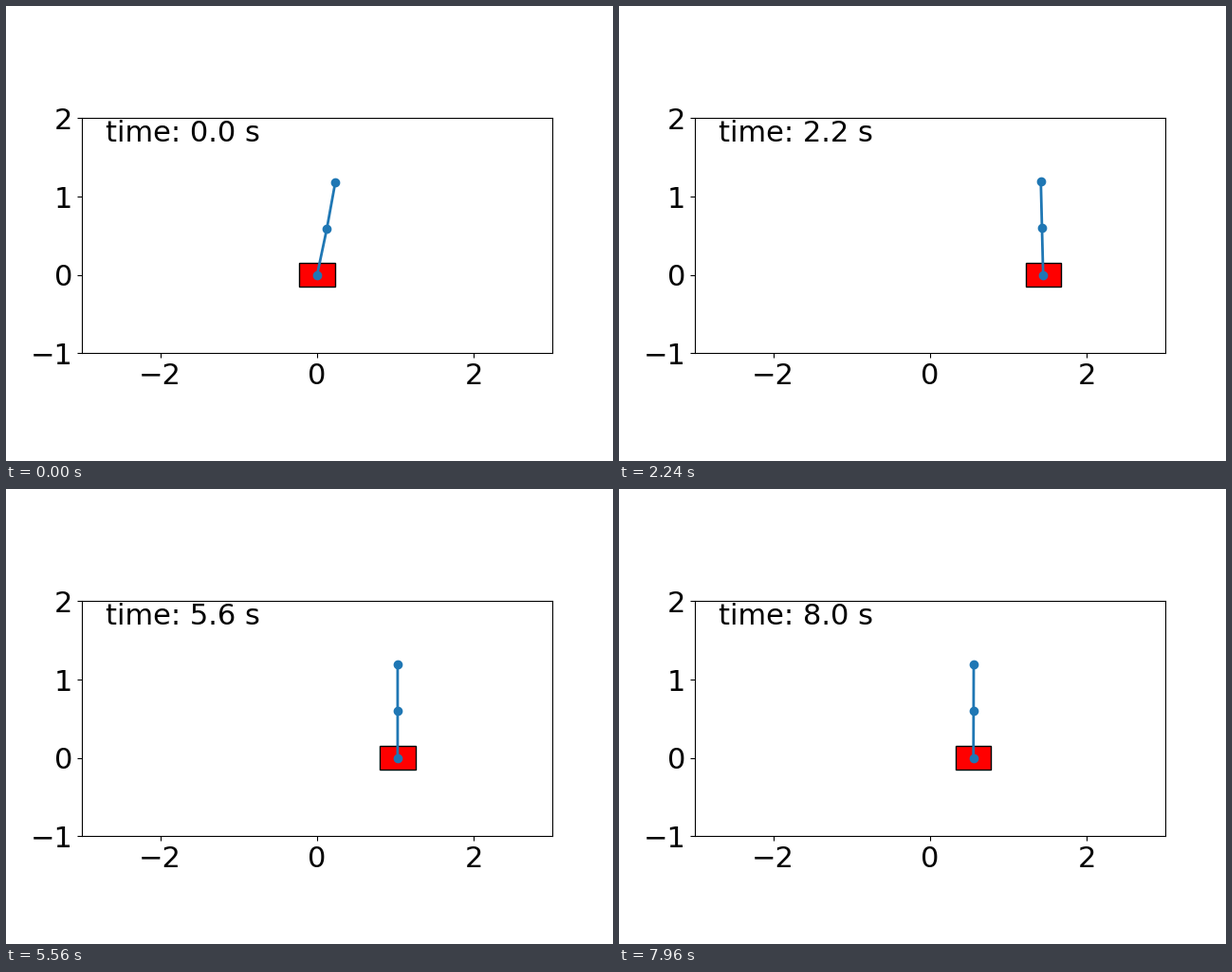
A matplotlib script for the animation above (8000 ms loop, 640 by 480 pixels).

```python
import numpy as np
import matplotlib.pyplot as plt
from matplotlib.animation import FuncAnimation
from matplotlib.patches import Rectangle

plt.rcParams.update({"font.family": "DejaVu Sans", "font.size": 22})

DT = 0.04
FRAMES = 200
G = 9.81
LINK = 0.6
CART_W, CART_H = 0.45, 0.3

# Slow return of the cart: damped swing about its furthest point
REACH, T_PEAK, DAMP, FREQ = 1.467, 2.67, 0.305, 0.19
# Quick balancing swing at the start
SWING, T_SWING, SWING_DAMP, SWING_FREQ = 0.266, 0.83, 2.0, 2.5
KICK_DAMP = 7.0

# Extra lean of each link (radians) while it is being caught
LEAN_T = np.array([0, 0.2, 0.4, 0.6, 0.8, 1.0, 1.16, 1.4, 1.7, 2.2])
LOWER = np.array([0.28, 0.235, 0.10, -0.05, -0.12, -0.098, -0.062, -0.026, -0.006, 0])
UPPER = np.array([0.252, 0.222, 0.115, -0.035, -0.10, -0.075, -0.037, -0.010, 0, 0])


def slow(t):
    """Position, speed and acceleration of the slow cart motion."""
    s = t - T_PEAK
    e, c, n = np.exp(-DAMP * s), np.cos(FREQ * s), np.sin(FREQ * s)
    k = REACH * (DAMP**2 + FREQ**2) / FREQ
    pos = REACH * e * (c + DAMP / FREQ * n)
    return pos, -k * e * n, -k * e * (FREQ * c - DAMP * n)


def swing(t):
    """Position and speed of the quick balancing swing."""
    u = t - T_SWING
    e, c, n = np.exp(-SWING_DAMP * u), np.cos(SWING_FREQ * u), np.sin(SWING_FREQ * u)
    return SWING * e * n, SWING * e * (SWING_FREQ * c - SWING_DAMP * n)


# The kick makes the cart start at rest in the origin
KICK = -(slow(0)[0] + swing(0)[0])
KICK_RATE = KICK_DAMP * KICK - (slow(0)[1] + swing(0)[1])


def cart_x(t):
    kick = np.exp(-KICK_DAMP * t) * (KICK + KICK_RATE * t)
    return slow(t)[0] + swing(t)[0] + kick


def smooth(t, times, values):
    """Cubic Hermite curve through the points, flat at both ends."""
    if t >= times[-1]:
        return values[-1]
    slopes = np.gradient(values, times)
    slopes[0] = slopes[-1] = 0
    i = np.searchsorted(times, t, side="right") - 1
    h = times[i + 1] - times[i]
    s = (t - times[i]) / h
    return ((1 + 2 * s) * (1 - s) ** 2 * values[i]
            + s * (1 - s) ** 2 * h * slopes[i]
            + s * s * (3 - 2 * s) * values[i + 1]
            - s * s * (1 - s) * h * slopes[i + 1])


def joints(t):
    lean = slow(t)[2] / G
    angles = [lean + smooth(t, LEAN_T, v) for v in (LOWER, UPPER)]
    xs = cart_x(t) + np.cumsum([0, *(LINK * np.sin(angles))])
    ys = np.cumsum([0, *(LINK * np.cos(angles))])
    return xs, ys


fig = plt.figure(figsize=(6.4, 4.8), dpi=100)
ax = fig.add_subplot(xlim=(-3, 3), ylim=(-1, 2))
ax.set_aspect("equal")
ax.set_xticks([-2, 0, 2])
ax.set_yticks([-1, 0, 1, 2])

cart = ax.add_patch(Rectangle((0, -CART_H / 2), CART_W, CART_H,
                              facecolor="red", edgecolor="black", linewidth=1))
pole, = ax.plot([], [], "o-", color="C0", linewidth=2, markersize=6)
clock = ax.text(0.05, 0.9, "", transform=ax.transAxes)


def update(i):
    t = i * DT
    xs, ys = joints(t)
    cart.set_x(xs[0] - CART_W / 2)
    pole.set_data(xs, ys)
    clock.set_text(f"time: {t:.1f} s")
    return cart, pole, clock


anim = FuncAnimation(fig, update, frames=FRAMES, init_func=lambda: update(0),
                     interval=DT * 1000, repeat=True, repeat_delay=0)
plt.show()
```
